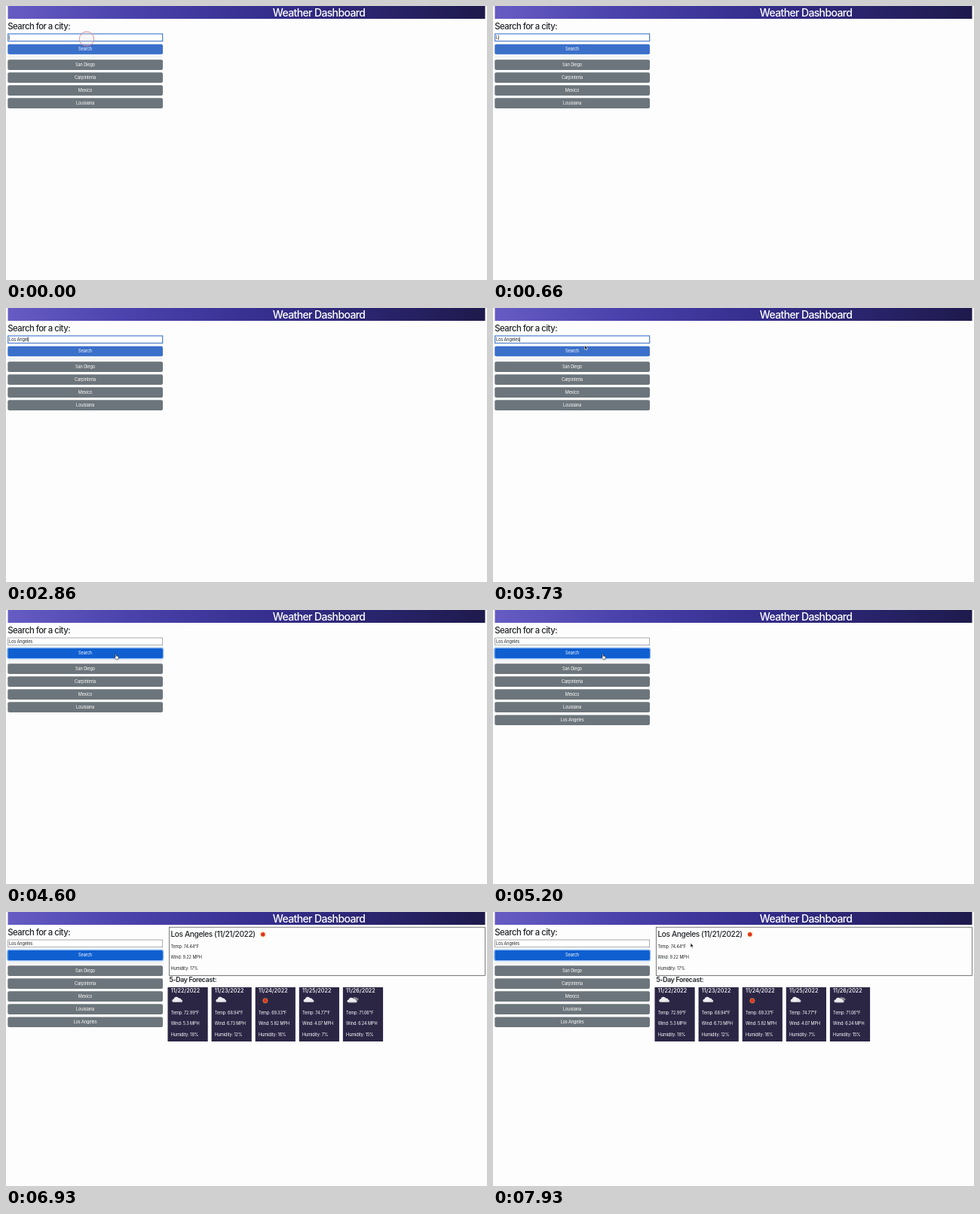
These frames come from a looping animation (638x364 px, 8 s). An HTML page:

```html
<!DOCTYPE html>
<html lang="en">
<head>
<meta charset="utf-8">
<title>Weather Dashboard</title>
<style>
  html, body { margin: 0; width: 100%; height: 100%; overflow: hidden; background: #fdfdfd; }
  svg { display: block; width: 100vw; height: 100vh; }
  text { font-family: Inter, Roboto, sans-serif; font-size: 5.6px; letter-spacing: -.02em; fill: #212529; white-space: pre; }
  .btn { fill: #fff; text-anchor: middle; }
  .h1 { font-size: 14px; font-weight: 500; letter-spacing: -.045em; fill: #fff; text-anchor: middle; }
  .h2 { font-size: 11.3px; font-weight: 500; letter-spacing: -.045em; }
  .h3 { font-size: 10.2px; font-weight: 500; letter-spacing: -.04em; }
  .h4 { font-size: 8.8px; font-weight: 600; letter-spacing: -.04em; }
  .h5 { font-size: 7.3px; font-weight: 500; letter-spacing: 0; }
  .card text { fill: #fff; }
</style>
</head>
<body>
<svg id="stage" viewBox="0 0 638 364">
  <defs>
    <linearGradient id="bar">
      <stop offset="0" stop-color="#665cc3"/>
      <stop offset=".25" stop-color="#4b42ac"/>
      <stop offset=".55" stop-color="#352e8d"/>
      <stop offset="1" stop-color="#1e1a4c"/>
    </linearGradient>
    <g id="cloud">
      <path d="M-5.5 3a2 2 0 0 1 .2-4a3.7 3.7 0 0 1 6.8-1.2a2.6 2.6 0 0 1 3.2 2a1.7 1.7 0 0 1 .8 3.2z" fill="#eeeef1"/>
      <path d="M-5.5 3a2 2 0 0 1-1.6-1.3q6 1 13.2-.5a1.7 1.7 0 0 1-.6 1.8z" fill="#b9b8c0"/>
    </g>
    <g id="broken">
      <path d="M-1-1a3.2 3.2 0 0 1 5.2-2a2 2 0 0 1 2.6 1.6l1.4.4-2 2z" fill="#85838d"/>
      <use href="#cloud" transform="translate(-.6 .7) scale(.95)"/>
    </g>
    <g id="sun">
      <path id="rays" fill="#ee9a35"/>
      <circle r="2.5" fill="#e0302a"/>
    </g>
  </defs>
  <rect x="2.5" width="633" height="17" fill="url(#bar)"/>
  <text class="h1" x="415" y="14">Weather Dashboard</text>
  <text class="h2" x="2.3" y="31.2">Search for a city:</text>
  <rect id="field" x="2.7" y="37" width="205" height="9.7" fill="#fff"/>
  <text id="typed" x="3.9" y="44"></text>
  <rect id="caret" y="38.7" width=".6" height="6.4" fill="#111"/>
  <rect id="search" x="2.3" y="50.8" width="205.7" height="13.4" rx="2"/>
  <rect id="halo" x="1.7" y="50.2" width="206.9" height="14.6" rx="2.4" fill="none" stroke="#8db8f3" stroke-width="1.3"/>
  <text class="btn" x="105" y="59.4">Search</text>
  <path d="M2.3 67.7H208" stroke="#d4d6d8" stroke-width=".6"/>
  <g id="history"></g>
  <g id="results">
    <rect x="216.5" y="20.2" width="419" height="64.2" fill="none" stroke="#444" stroke-width=".7"/>
    <text class="h3" x="218.5" y="33.2">Los Angeles (11/21/2022)</text>
    <use href="#sun" x="340.8" y="29.8"/>
    <text class="h4" x="216.5" y="93.2">5-Day Forecast:</text>
  </g>
  <circle id="ring" fill="#f3dede" fill-opacity=".25" stroke="#d9777c" stroke-width=".8"/>
  <g id="pointer">
    <path id="beam" d="M-1.3-3.5Q0-3.5 0-2.7Q0-3.5 1.3-3.5M0-2.7V2.7M-1.3 3.5Q0 3.5 0 2.7Q0 3.5 1.3 3.5" fill="none" stroke="#222" stroke-width=".6"/>
    <path id="arrow" d="M0 0V5.8L1.4 4.6L2.3 6.7L3.3 6.3L2.4 4.3H4.2Z" fill="#111" stroke="#fff" stroke-width=".6"/>
    <path id="hand" d="M-.5 3.2V-1.2Q.1-2 .7-1.2V1L3.3 1.5Q4 1.8 3.8 3L3.2 5.8H.4L-1.7 3.2Q-1.7 2.3-.5 3.2Z" fill="#fff" stroke="#111" stroke-width=".6"/>
  </g>
</svg>
<script>
const LOOP = 8000, CLICK = 4230, SAVED = 4800, LOADED = 5300;
const CITY = 'Los Angeles';
const KEYS = [480, 680, 880, 1100, 1400, 1750, 2050, 2350, 2700, 3020, 3250];
const $ = id => document.getElementById(id);
const set = (el, attrs) => { for (const k in attrs) el.setAttribute(k, attrs[k]); return el; };
const show = (el, on) => el.setAttribute('visibility', on ? 'visible' : 'hidden');

function add(parent, tag, attrs, text) {
  const el = set(document.createElementNS('http://www.w3.org/2000/svg', tag), attrs);
  if (text) el.textContent = text;
  return parent.appendChild(el);
}

function readings(parent, x, y, temp, wind, humidity) {
  [`Temp: ${temp}°F`, `Wind: ${wind} MPH`, `Humidity: ${humidity}%`]
    .forEach((line, i) => add(parent, 'text', { x, y: y + i * 14.25 }, line));
}

const star = Array.from({ length: 20 }, (_, i) => {
  const a = i * Math.PI / 10, r = i % 2 ? 2.6 : 4.2;
  return `${(r * Math.cos(a)).toFixed(2)} ${(r * Math.sin(a)).toFixed(2)}`;
});
$('rays').setAttribute('d', `M${star.join('L')}Z`);

const rows = ['San Diego', 'Carpinteria', 'Mexico', 'Louisiana', CITY].map((name, i) => {
  const row = add($('history'), 'g', {}), y = 71.3 + i * 17.02;
  add(row, 'rect', { x: 2.3, y, width: 205.7, height: 13.6, rx: 2, fill: '#6c757b' });
  add(row, 'text', { class: 'btn', x: 105, y: y + 8.9 }, name);
  return row;
});

readings($('results'), 218.5, 48.2, '74.44', '9.22', 17);
[
  ['cloud', '72.99', '5.3', 18],
  ['cloud', '68.94', '6.73', 12],
  ['sun', '69.33', '5.82', 16],
  ['cloud', '74.77', '4.07', 7],
  ['broken', '71.06', '6.24', 15]
].forEach(([icon, ...data], i) => {
  const card = add($('results'), 'g', { class: 'card' }), x = 214.5 + i * 58.1;
  add(card, 'rect', { x, y: 100, width: 53.2, height: 72, fill: '#2c2645' });
  add(card, 'text', { class: 'h5', x: x + 4.2, y: 107.2 }, `11/${22 + i}/2022`);
  add(card, 'use', { href: '#' + icon, x: x + 13.2, y: icon === 'sun' ? 117.8 : 116.8 });
  readings(card, x + 4.2, 136, ...data);
});

// Pointer stops: [time, x, y]
const STOPS = [
  [3480, 107, 43], [4080, 145.5, 60], [6200, 145.5, 60], [6700, 300, -10],
  [7380, 300, -10], [7800, 262, 41.3], [LOOP, 262, 41.3]
];
function pointerAt(t) {
  const i = Math.max(1, STOPS.findIndex(s => s[0] >= t));
  const [t0, x0, y0] = STOPS[i - 1], [t1, x1, y1] = STOPS[i];
  const u = Math.min(1, Math.max(0, (t - t0) / (t1 - t0))), e = u * u * (3 - 2 * u);
  return [x0 + (x1 - x0) * e, y0 + (y1 - y0) * e];
}

function clickRing(t) {
  const late = t >= CLICK, age = late ? t - CLICK : t + 160;
  show($('ring'), age < 360);
  set($('ring'), {
    cx: late ? 145.5 : 107, cy: late ? 61 : 43.7,
    r: Math.min(9.7, 4 + age * .036),
    opacity: Math.max(0, Math.min(1, (360 - age) / 180))
  });
}

function draw(t) {
  const focused = t < CLICK;
  $('typed').textContent = CITY.slice(0, KEYS.filter(k => k <= t).length);
  set($('field'), focused ? { stroke: '#3973c9', 'stroke-width': 1.1 } : { stroke: '#85878a', 'stroke-width': .7 });
  show($('caret'), focused);
  $('caret').setAttribute('x', 3.9 + ($('typed').textContent ? $('typed').getComputedTextLength() : 0));

  const [x, y] = pointerAt(t);
  const overSearch = x < 208 && y > 50.8 && y < 64.2;
  const overField = x < 208 && y > 37 && y < 46.7;
  const live = t >= STOPS[0][0];
  set($('search'), { fill: !focused || live && overSearch ? '#0f5fd0' : '#3b70ca' });
  show($('halo'), !focused);
  show(rows[4], t >= SAVED);
  show($('results'), t >= LOADED);

  $('pointer').setAttribute('transform', `translate(${x} ${y})`);
  show($('beam'), live && overField);
  show($('hand'), live && overSearch);
  show($('arrow'), live && !overField && !overSearch);
  clickRing(t);
}

const start = performance.now();
function tick() {
  draw((performance.now() - start) % LOOP);
  requestAnimationFrame(tick);
}
tick();
</script>
</body>
</html>
```
